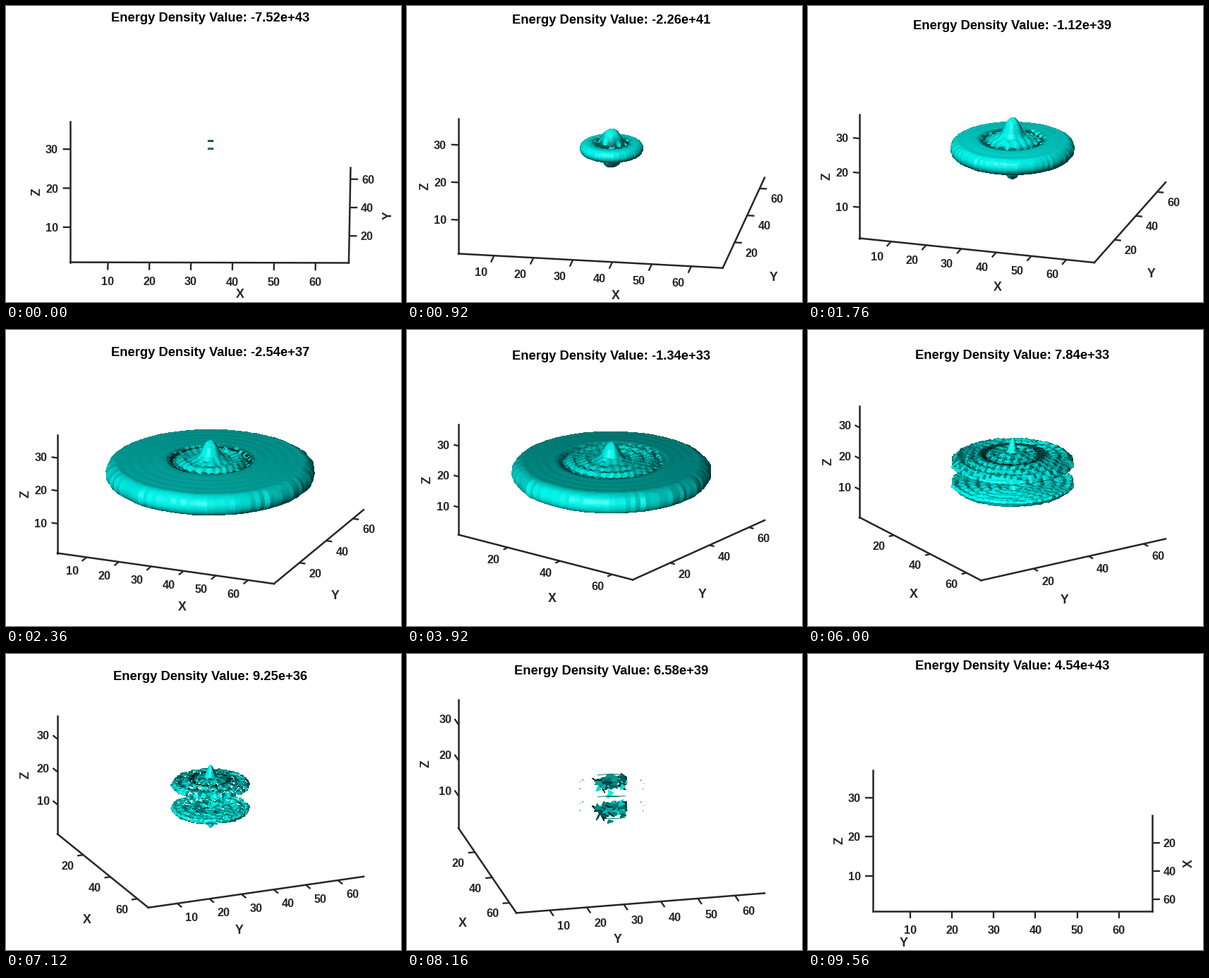
A matplotlib script for the animation above (9.64 s loop, 560x420 px).

```python
import numpy as np
import matplotlib.pyplot as plt
from matplotlib.animation import FuncAnimation
from matplotlib.collections import LineCollection, PolyCollection

W, H, DPI = 560, 420, 100
STEPS = 240
CX = 290
SPAN_XY, SPAN_Z = 67, 36
SIN_E, COS_E = np.sin(np.radians(20)), np.cos(np.radians(20))
VIEW = np.array([0, -COS_E, SIN_E])
INK = "#262626"
N_TH, N_R = 120, 46

plt.rcParams["font.family"] = "Liberation Sans"
plt.rcParams["font.weight"] = "bold"

rng = np.random.default_rng(4)
THETA = np.linspace(0, 2 * np.pi, N_TH + 1)
U = np.sin(np.pi / 2 * np.linspace(0, 1, N_R + 1))
RIM = rng.normal(size=N_TH)
RIM = np.r_[RIM, RIM[0]]
GAPS = rng.random((N_R, N_TH))

N_CHUNK = 75
CHUNK_R = np.sqrt(rng.random(N_CHUNK))
CHUNK_TH = rng.random(N_CHUNK) * 2 * np.pi
CHUNK_Z = rng.normal(size=N_CHUNK) * 0.5
CHUNK_GAIN = rng.uniform(0.5, 1.15, N_CHUNK)
turn = rng.random((N_CHUNK, 1)) * 6.28 + np.arange(3) * 2.1 + rng.normal(size=(N_CHUNK, 3)) * 0.3
CHUNK_SHAPE = np.stack([np.cos(turn), np.sin(turn), 0.7 * rng.normal(size=turn.shape)], -1)

fig = plt.figure(figsize=(W / DPI, H / DPI), dpi=DPI, facecolor="white")
ax = fig.add_axes([0, 0, 1, 1])
ax.set_xlim(0, W)
ax.set_ylim(H, 0)
ax.axis("off")
surface = PolyCollection([], antialiased=False, linewidths=0.4, zorder=2)
threads = LineCollection([], colors="#0a7a76", linewidths=0.7, zorder=2)
frame_lines = LineCollection([], colors=INK, linewidths=2.5 * 72 / DPI,
                             capstyle="projecting", zorder=1)
tick_lines = LineCollection([], colors=INK, linewidths=2.3 * 72 / DPI,
                            capstyle="butt", zorder=1)
for coll in (surface, threads, frame_lines, tick_lines):
    ax.add_collection(coll, autolim=False)


class Camera:
    """Orthographic view that fits the box into the plot area."""

    def __init__(self, k):
        self.az = (k + 1) * 90 / STEPS
        a = np.radians(self.az)
        self.c, self.s = np.cos(a), np.sin(a)
        total = self.c + self.s
        t = min(1, max(0, min(self.az, 90 - self.az) - 0.4) / 9)
        z_rel = COS_E * SPAN_Z / SPAN_XY
        room = 335 + 7 * t
        size = min(434 / total, room / (z_rel + SIN_E * total))
        self.unit = size / SPAN_XY
        self.cy = 197 + 5 * t
        self.top = self.cy - size * (z_rel + SIN_E * total) / 2
        self.tick = 0.0275 * size * max(np.hypot(self.c, SIN_E * self.s),
                                        np.hypot(self.s, SIN_E * self.c))

    def screen(self, p):
        """Pixels from points already turned to (right, away, up)."""
        return np.stack([CX + self.unit * p[..., 0],
                         self.cy - self.unit * (SIN_E * p[..., 1] + COS_E * p[..., 2])], -1)

    def data(self, x, y, z):
        x, y, z = x - 34.5, y - 34.5, z - 19
        turned = np.array([x * self.c + y * self.s, -x * self.s + y * self.c, z])
        return self.screen(turned)


# ---- surface ----

def sheet(cam, r, z, flip=False, jitter=0.006):
    """Quads and normals of a surface of revolution with a rough rim."""
    radius = r[:, None] * (1 + jitter * RIM * U[:, None] ** 6)
    th = THETA - np.radians(cam.az)
    p = np.stack([radius * np.cos(th), radius * np.sin(th), z], -1)
    quads = np.stack([p[:-1, :-1], p[1:, :-1], p[1:, 1:], p[:-1, 1:]], 2)
    normals = np.cross(quads[:, :, 2] - quads[:, :, 0], quads[:, :, 3] - quads[:, :, 1])
    return quads, -normals if flip else normals


def facing(quads, normals, gain, keep=None):
    seen = normals @ VIEW > 0
    if keep is not None:
        seen &= keep
    return quads[seen], normals[seen], np.broadcast_to(gain, seen.shape)[seen]


def lumps(r):
    """Bumps that follow the square sampling grid."""
    x, y = r[:, None] * np.cos(THETA), r[:, None] * np.sin(THETA)
    return np.sin(2.1 * x + 0.6) * np.sin(2.1 * y + 0.3)


def rounded(r, R, w):
    return np.sqrt(1 - np.clip((r - R + w) / w, 0, 1) ** 2)


def single_disc(cam, k):
    marks = [0, 8, 25, 44, 59, 98, 119]
    R = np.interp(k, marks, [0.55, 2.5, 8.5, 16.75, 29.6, 30.2, 30.4])
    groove = np.interp(k, marks, [0.3, 1.2, 4, 7.7, 10.8, 14.8, 16.5])
    thick = np.interp(k, marks, [0.3, 0.6, 1.3, 2, 2.95, 3.1, 3.1])
    grow = min(1, R / 14)
    r = R * U
    bumps = lumps(r)
    near = np.exp(-((r - groove) / 1.2) ** 2)
    inner = r < groove
    extra = grow * (1.5 * (1 - U) + 4.9 * np.exp(-(r / 2.8) ** 4) - 0.9 * near
                    + 0.35 * np.cos(1.5 * r) * inner + 0.02 * np.cos(2.1 * r))
    rough = grow * (0.35 * near + 0.22 * inner + 0.18 * U ** 20)
    z = rounded(r, R, thick)[:, None] * (thick + extra[:, None] + rough[:, None] * bumps)
    depth = np.interp(k, [44, 59, 98], [0.65, 0.75, 0.45])
    dark = 1 - depth * near[:-1, None] * (bumps[:-1, :-1] > -0.35)
    return [facing(*sheet(cam, r, z), dark),
            facing(*sheet(cam, r, -z, True), dark)]


def twin_discs(cam, k):
    if k < 8:
        R, z0, grow, gain, gaps = 0.5 + 0.25 * k, 1, 0, 0.45 + 0.06 * k, 0
    else:
        R = np.interp(k, [120, 150, 180, 200], [30, 18.4, 10.5, 7])
        z0 = np.interp(k, [120, 150], [2.6, 3.6])
        gaps = np.interp(k, [150, 165, 190], [0, 0.3, 1.01])
        gain, grow = 1, min(1, R / 14)
    r = R * U
    bumps = lumps(r)
    mid = z0 + grow * (2.4 * (1 - U) + 3.8 * np.exp(-(r / 1.3) ** 2) + 0.4 * np.cos(1.9 * r))
    half = 0.65 * min(1, R / 8) * rounded(r, R, R / 12)
    band = np.exp(-((U - 0.47) / 0.07) ** 4)[:-1, None]
    rough = 0.22 * grow * bumps
    spots = 1 - 0.4 * (bumps[:-1, :-1] > 0.35)
    parts = []
    for side in (1, -1):
        shade = gain * (1 - 0.65 * band) * spots if side > 0 else 1.1 * gain
        for face in (1, -1):
            z = side * (mid[:, None] + rough) + face * half[:, None]
            parts.append(facing(*sheet(cam, r, z, face < 0, 0.01), shade, GAPS >= gaps))
    return parts


def chunks(cam, k):
    count = int(N_CHUNK * np.interp(k, [172, 190, 204, 225, 234], [0, 1, 1, 0.3, 0]))
    radius = np.interp(k, [172, 204, 234], [8, 4.1, 0.8])
    th = CHUNK_TH - np.radians(cam.az)
    parts = []
    for side in (1, -1):
        centre = np.stack([radius * CHUNK_R * np.cos(th), radius * CHUNK_R * np.sin(th),
                           side * 3.8 + CHUNK_Z], -1)
        tri = (centre[:, None] + CHUNK_SHAPE * [1, side, 1])[:count]
        quads = tri[:, [0, 1, 2, 2]]
        n = np.cross(tri[:, 2] - tri[:, 0], tri[:, 2] - tri[:, 1])
        n *= np.where(n @ VIEW < 0, -1, 1)[:, None]
        parts.append((quads, n, CHUNK_GAIN[:count]))
    return parts


def draw_surface(cam, k):
    if k < 8:
        parts = twin_discs(cam, k)
    elif k < 120:
        parts = single_disc(cam, k)
    else:
        parts = (twin_discs(cam, k) if k < 190 else []) + (chunks(cam, k) if k > 172 else [])
    quads, normals, gain = (np.concatenate(g) for g in zip(*parts))
    if not len(quads):
        surface.set_verts([])
        return
    normals = normals / (np.linalg.norm(normals, axis=1, keepdims=True) + 1e-9)
    up = np.interp(k, [0, 44, 59, 98, 150], [0.9, 0.8, 0.45, 0.32, 0.4])
    light = np.array([-0.35, -0.85, up])
    light /= np.linalg.norm(light)
    half = light + VIEW
    half /= np.linalg.norm(half)
    level = np.clip((0.25 + 0.8 * np.clip(normals @ light, 0, 1)) * gain, 0, 1)
    shine = 0.4 * np.clip(normals @ half, 0, 1) ** 40 * np.clip(gain, 0, 1)
    rgb = level[:, None] * [0.01, 0.95, 0.91] + shine[:, None] * [0.8, 0.1, 0.1]
    order = np.argsort(quads.mean(1) @ VIEW)
    rgb = np.clip(rgb, 0, 1)[order]
    surface.set_verts(cam.screen(quads[order]))
    surface.set_facecolor(rgb)
    surface.set_edgecolor(rgb)


def draw_threads(cam, k):
    segs = []
    if 180 <= k < 224:
        r = np.interp(k, [180, 204, 224], [10, 8.7, 7.5])
        arcs = [(75, 115), (-100, -65), (148, 154), (160, 163), (24, 30), (8, 11), (-20, -16), (194, 200)]
        for z in (3.06, -3.06):
            for a, b in arcs:
                th = np.radians(np.linspace(a, b, 9))
                segs.append(cam.screen(np.stack([r * np.cos(th), r * np.sin(th), 0 * th + z], -1)))
    threads.set_segments(segs)


# ---- axes and text ----

def write(x, y, text, px=16.3, color=INK, turned=False):
    if turned:
        ax.text(x + 2, y, text, size=px * 72 / DPI, color=color, rotation=90,
                ha="center", va="center")
    else:
        ax.text(x, y + 0.345 * px, text, size=px * 72 / DPI, color=color,
                ha="center", va="baseline")


def unit(v):
    return v / np.hypot(*v)


def label_shift(angle):
    marks = [0, 15, 35, 55, 75, 90]
    return np.array([np.interp(angle, marks, [43, 31, 11.5, -7.5, -32, -57]),
                     np.interp(angle, marks, [44, 51, 56.5, 62, 72.5, 82])])


def draw_axes(cam, k):
    first, last = k == 0, k == STEPS - 1
    P = cam.data
    front, right = P(68, 1, 1), P(68, 68, 1)
    left = front if last else P(1, 1, 1)
    x_start, x_end = (P(1, 68, 1), right) if last else (left, front)
    z_xy = (68, 1) if last else (1, 1)
    x_dir, y_dir = unit(front - P(1, 1, 1)), unit(right - front)
    ticks = []

    def axis(start, end, hi, step, out, gap):
        for v in range(step, hi, step):
            p = start + (end - start) * (v - 1) / (hi - 1)
            tip = p + cam.tick * out
            ticks.append([p, tip])
            write(*(tip + gap), str(v))

    def step(a, b):
        return 10 if np.hypot(*(b - a)) > 288 else 20

    x_out = y_dir if last else -y_dir
    x_gap = (14, 0.5) if last else (0, 16) if cam.az < 1 else (-14, 14)
    y_gap = (0, 16) if last else (14, 0.5) if first else (14, 14)
    axis(x_start, x_end, 68, step(x_start, x_end), x_out, np.array(x_gap))
    axis(front, right, 68, step(front, right), x_dir, np.array(y_gap))
    z_top = P(*z_xy, 37)
    z_out = -y_dir if last else -x_dir
    z_gap = -15.5 if last else -(12.3 + 3.3 * cam.c)
    axis(left, z_top, 37, 10, z_out, np.array([z_gap, 0.5]))
    frame_lines.set_segments([[x_start, x_end], [front, right], [left, z_top]])
    tick_lines.set_segments(ticks)

    x_off = np.array([51, 0]) if last else label_shift(cam.az)
    y_off = label_shift(90 - cam.az) * [-1, 1]
    if first:
        y_off = np.array([53, 0])
    elif last:
        y_off = np.array([-154, 44])
    write(*((x_start + x_end) / 2 + x_off), "X", 17.8, turned=last)
    write(*((front + right) / 2 + y_off), "Y", 17.8, turned=first)
    write(*((left + z_top) / 2 - [cam.tick + 38.5, 0]), "Z", 17.8, turned=True)


def density(k):
    rate = 0.109694
    if k < STEPS // 2:
        return -10 ** (43.8762 - rate * k)
    return 10 ** (43.6573 - rate * (STEPS - 1 - k))


def update(i):
    k = min(i, STEPS - 1)
    for t in list(ax.texts):
        t.remove()
    cam = Camera(k)
    draw_axes(cam, k)
    draw_surface(cam, k)
    draw_threads(cam, k)
    write(CX - 0.5, cam.top - 13.6, f"Energy Density Value: {density(k):.2e}", 18.35, "black")
    return []


anim = FuncAnimation(fig, update, frames=STEPS + 1, interval=40,
                     init_func=lambda: [], repeat=True, repeat_delay=0, blit=False)
plt.show()
```
